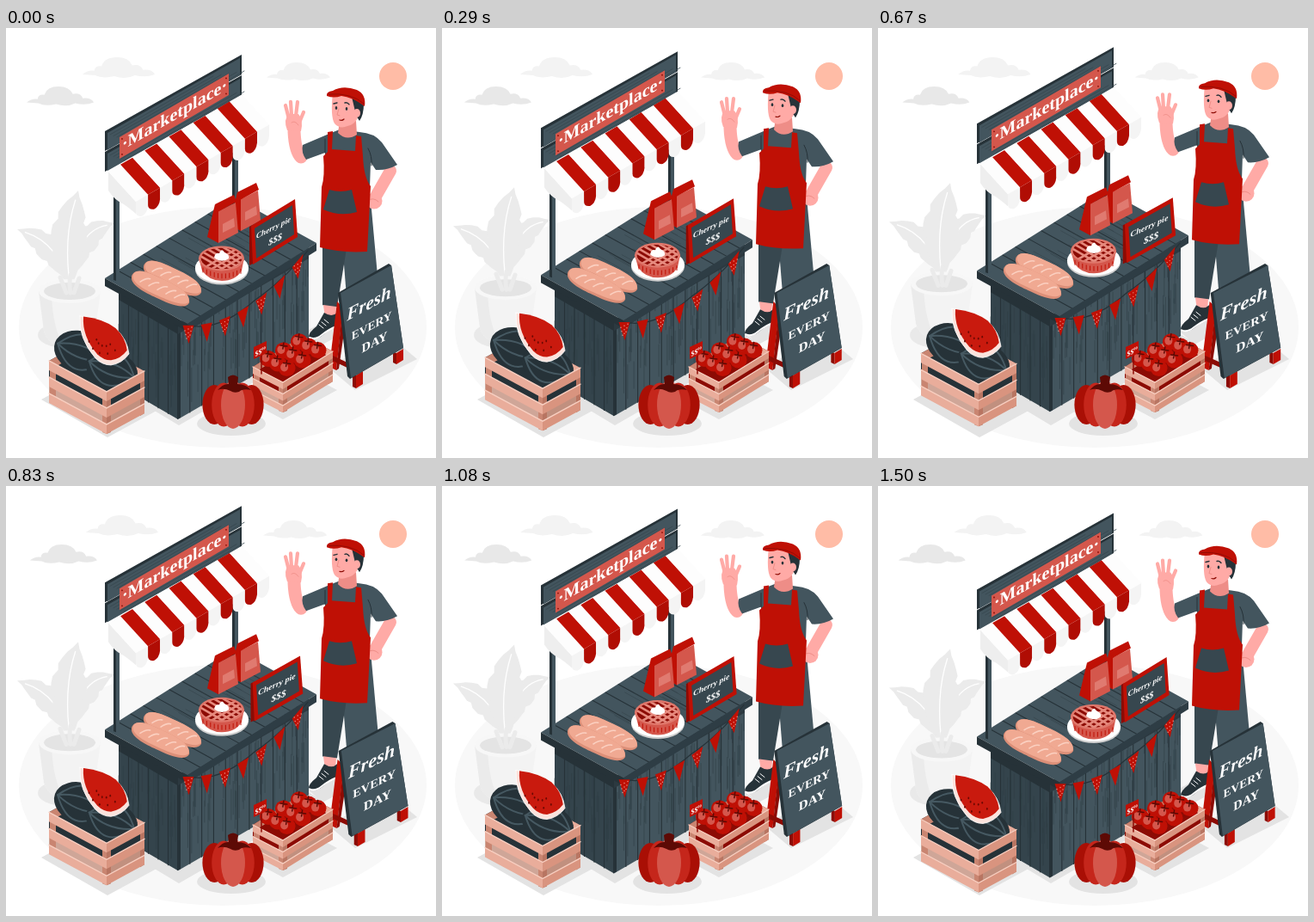
An HTML page that plays this animation: 500x500 px, repeating every 1540 ms.

```html
<!DOCTYPE html>
<html lang="en">
<head>
<meta charset="utf-8">
<title>Market stall</title>
<style>
html, body { margin: 0; width: 100%; height: 100%; overflow: hidden; background: #fff }
svg { display: block; width: 100vw; height: 100vh }
text { fill: #fff; font-family: "Liberation Serif", serif; font-weight: bold; text-anchor: middle }
.script { font-style: italic }
</style>
</head>
<body>
<svg id="stage" viewBox="0 0 500 500"></svg>
<script>
const RED = '#bf1005', ROSE = '#d4574c', WINE = '#8c0b04', SLATE = '#37474f', STEEL = '#43555e',
      INK = '#263238', SKIN = '#ffaaa6', SKIN_DARK = '#ee8d87', PALE = '#ebebeb', SHADE = '#e3e3e3';

let seed = 7;
const rnd = () => (seed = seed * 16807 % 2147483647) / 2147483647;
const times = (n, f) => Array.from({length: n}, (_, i) => f(i)).join('');

const poly = (pts, fill) => `<polygon points="${pts}" fill="${fill}"/>`;
const shape = (d, fill) => `<path d="${d}" fill="${fill}"/>`;
const line = (d, color, w = 1) =>
  `<path d="${d}" fill="none" stroke="${color}" stroke-width="${w}" stroke-linecap="round"/>`;
const oval = (x, y, rx, ry, fill) => `<ellipse cx="${x}" cy="${y}" rx="${rx}" ry="${ry}" fill="${fill}"/>`;
const at = (x, y, body, more = '') => `<g transform="translate(${x} ${y}) ${more}">${body}</g>`;
const group = (move, body) => `<g data-move="${move}">${body}</g>`;
const clip = (id, mask, body) => `<clipPath id="${id}">${mask}</clipPath><g clip-path="url(#${id})">${body}</g>`;
const slanted = (s, x, y, size, slope, kind = '') =>
  `<text transform="matrix(1 ${slope} 0 1 ${x} ${y})" font-size="${size}" class="${kind}">${s}</text>`;

// Upright parallelogram on a slanted edge, and flat one from its left, front and right corners
const wall = (x0, y0, x1, y1, h, fill) => poly([x0, y0, x1, y1, x1, y1 + h, x0, y0 + h], fill);
const slab = ([lx, ly], [fx, fy], [rx, ry], fill) => poly([lx, ly, fx, fy, rx, ry, lx + rx - fx, ly + ry - fy], fill);
const post = (x, y, h) => wall(x, y, x + 3, y + 1, h, INK) + wall(x + 3, y + 1, x + 7, y - 1, h, STEEL);
const leg = (x, y, h) => wall(x, y, x + 4, y + 2, h, WINE) + wall(x + 4, y + 2, x + 12, y - 3, h, RED);

function planks(x0, y0, x1, y1, h, n, fill) {
  const stroke = (k, a, len, color, w) => line(`M${x0 + (x1 - x0) * k} ${y0 + (y1 - y0) * k + a * h}v${len * h}`, color, w);
  return wall(x0, y0, x1, y1, h, fill) +
    times(n * 7, () => stroke(rnd(), rnd() * .6, .15 + rnd() * .25, '#2f3e46', .6)) +
    times(n - 1, i => stroke((i + 1) / n, 0, 1, INK, 1.1));
}

function crate(L, F, R, gap, slat, inside, goods) {
  const [lx, ly] = L, [fx, fy] = F, [rx, ry] = R, bx = lx + rx - fx, by = ly + ry - fy, h = gap * 2 + slat;
  const sides = (dy, tall, left, right) => wall(lx, ly + dy, fx, fy + dy, tall, left) + wall(fx, fy + dy, rx, ry + dy, tall, right);
  const row = i => sides(i * gap, slat, '#e9ad9b', '#d9947f') +
    line(`M${lx} ${ly + i * gap}L${fx} ${fy + i * gap}L${rx} ${ry + i * gap}`, '#f8cfc1', 1.4);
  return slab(L, F, R, inside) + wall(lx, ly, bx, by, slat, '#c98571') + wall(bx, by, rx, ry, slat, '#e9ad9b') +
    sides(0, gap * 2, inside, inside) + sides(gap + 2, gap, '#cfa698', '#c1907f') + goods +
    post(lx + 1, ly + 2, h - 2).replaceAll(INK, '#c98571').replaceAll(STEEL, '#c98571') +
    wall(rx - 5, ry + 3, rx, ry, h, '#b87562') + wall(fx - 5, fy - 2, fx, fy, h, '#c98571') +
    wall(fx, fy, fx + 5, fy - 2, h, '#b87562') + times(3, row);
}

const cloud = (x, y, w, fill) => at(x, y,
  shape('M0 19Q6 14 13 15Q14 9 21 10Q24 0 38 0Q51 0 55 9Q64 7 67 14Q77 13 80 19Q70 23 58 20Q48 25 35 21Q22 24 14 20Z', fill), `scale(${w / 80})`);

// Notched leaf along a quadratic spine
function leaf(bend, tip, width) {
  const base = [75, 304], n = 16;
  const spine = t => [0, 1].map(i => base[i] * (1 - t) ** 2 + 2 * bend[i] * t * (1 - t) + tip[i] * t * t);
  const edge = side => Array.from({length: n + 1}, (_, i) => {
    const t = i / n, [x, y] = spine(t), [u, v] = spine(t + .01), d = Math.hypot(u - x, v - y);
    const w = side * width * Math.sin(Math.PI * t ** 1.15) * (i % 4 == 3 ? .8 : 1);
    return [x - (v - y) / d * w, y + (u - x) / d * w];
  });
  return poly([...edge(1), ...edge(-1).reverse()].join(' '), PALE) + line(`M${base}Q${bend} ${spine(.9)}`, '#fff', 1.3);
}

const plant = () => leaf([62, 250], [13, 234], 15) + leaf([80, 236], [126, 227], 15) + leaf([66, 245], [84, 189], 21) +
  shape('M38 306L44 352Q48 370 74 372Q99 370 104 350L110 306Z', '#f3f3f3') +
  shape('M38 306L44 352Q48 368 68 371Q54 350 53 308Z', PALE) +
  oval(74, 306, 36, 14, '#f7f7f7') + oval(74, 306, 30, 10, '#e4e4e4') +
  line('M75 308Q73 298 75 287M70 308L63 290M79 308L85 291', PALE, 5);

function man() {
  const raised = line('M335 120Q336 143 343 150', SKIN, 15) + line('M344 147L376 133', SKIN, 13) +
    shape('M327 119Q322 106 329 100L340 100Q346 106 343 120Z', SKIN) +
    line('M329 106L325 90M332 102L331 86M337 102L339 86M341 110L346 98', SKIN, 4.2) +
    line('M332 110Q336 107 340 113', SKIN_DARK, .8);
  const legs = shape('M391 250L424 200 434 310 397 325Z', STEEL) + shape('M368 248L397 250 385 324Q376 327 368 322Z', SLATE) +
    shape('M369 322L384 324 383 337 371 337Z', SKIN) +
    shape('M370 331Q379 337 385 331V346Q375 351 366 359Q357 364 352 359Q352 354 361 347Z', INK) +
    line('M353 360Q360 363 367 357Q376 350 384 347', '#fff', 2) + times(3, i => line(`M${364 + i * 3} ${345 - i * 3}l5 4`, '#fff'));
  const body = line('M447 166L431 194', SKIN, 14) + oval(428, 201, 9.5, 9.5, SKIN) + line('M420 201Q427 196 433 202', SKIN_DARK) +
    shape('M388 118L411 121Q428 122 437 133L455 159Q443 166 430 165L424 156 422 215 371 215V145L349 153Q343 145 345 136L378 122Z', STEEL) +
    line('M371 129V145M421 140Q426 149 425 160', INK);
  const apron = shape('M374 121L380 120 379 141 406 143 407 125 413 126 415 149Q416 174 424 184L420 260Q390 262 365 255L367 185Q371 173 369 149L374 144Z', RED) +
    shape('M376 188Q389 192 402 188L408 214Q388 220 369 211Z', SLATE);
  const head = shape('M388 108H407L408 124Q396 132 386 122Z', SKIN_DARK) +
    shape('M380 75Q377 103 382 111Q388 118 397 114Q408 112 411 98L409 78Z', SKIN) +
    shape('M402 80L416 88Q416 101 411 108Q407 103 406 97Z', INK) + oval(408, 99, 4, 5, SKIN) +
    oval(384, 93, 1.3, 1.9, INK) + oval(396, 94, 1.3, 1.9, INK) + line('M381 88l4-1M394 87q3-1 5 2', INK, 1.4) +
    line('M387 94l-2 7 3 1', SKIN_DARK) + line('M388 107q3 1 5-1', WINE, 1.2) +
    shape('M373 79Q372 74 380 73Q392 66 408 72Q419 77 417 91Q402 80 390 79Q381 82 373 79Z', RED) +
    line('M375 77Q402 75 416 88', WINE, .8);
  return raised + legs + body + apron + head;
}

function awning() {
  const w = 14.1, top = x => 167 - (x - 119) * .577, fold = x => 202 - (x - 151) * .577;
  return shape('M119 167L151 202V216Q143 209 137 205Q126 200 119 189Z', '#eee') + times(11, i => {
    const a = 119 + i * w, b = 151 + i * w, red = i % 2;
    return poly([a, top(a), a + w, top(a + w), b + w, fold(b + w), b, fold(b)], red ? RED : '#fdfdfd') +
      shape(`M${b} ${fold(b)}L${b + w} ${fold(b + w)}v13q-1 9 ${-w / 2} 12q-7 1 ${-w / 2} -5Z`, red ? '#b00d04' : '#f4f4f4');
  });
}

function bunting() {
  const y = x => 346 - 75 * ((x - 212) / 127) ** 2;
  const dots = x => times(9, k => {
    const row = k / 3 | 0;
    return oval(x + (k % 3 - 1) * (4 - row), y(x) + 4 + row * 4.5 - (k % 3 - 1) * 2, .7, .7, '#ed9a90');
  });
  return line('M205 344Q244 357 290 316Q320 296 351 259', INK, 1.2) + times(7, i => {
    const x = 212 + i * 21.2;
    return poly([x - 6.5, y(x - 6.5), x + 6.5, y(x + 6.5), x + .5, y(x) + 21], RED) + (i % 2 ? '' : dots(x));
  });
}

const bag = (x, y) => at(x, y, poly('9,4 0,42 13,49 15,12', RED) + poly('13,12 33,2 36,37 13,49', ROSE) +
  poly('9,4 31,-7 34,1 12,13', RED) + poly('18,27 31,20 32,30 18,37', '#e07a70'));

function pie() {
  const lattice = times(8, i => line(`M${200 + i * 11} 250l60 35m-40 0l60 -35`, '#e68a7e', 2.6));
  return oval(251, 281, 31, 17.5, '#cfcfcf') + oval(251, 279, 31, 17.5, '#fff') +
    shape('M224 267L228 282Q236 294 251 294Q267 294 274 282L277 267Z', ROSE) +
    times(11, i => line(`M${229 + i * 4.4} ${278 + 8 * Math.sin((i + .5) * .27)}v5`, RED)) +
    oval(250.5, 268, 26.5, 14.5, '#e0776b') +
    clip('crust', oval(250.5, 268, 24, 12.5), oval(250.5, 268, 24, 12.5, WINE) + lattice) +
    shape('M242 267Q243 261 248 262Q251 255 254 261Q260 263 259 268Q251 274 242 267Z', '#fff');
}

const loaf = (x, y) => at(x, y, shape('M-37 0C-36 -13 -12 -11 0 -11C15 -11 34 -10 37 1C36 12 14 12 0 12C-14 12 -36 12 -37 0Z', '#dc8f78') +
  shape('M-36 -2C-35 -12 -12 -11 0 -11C15 -11 34 -10 36 0C35 8 14 9 0 9C-14 9 -36 9 -36 -2Z', '#f0a992') +
  times(5, i => line(`M${-25 + i * 11} 3q4 -7 9 -8`, '#fbd0c1', 1.6)), 'rotate(25)');

function stall() {
  const sign = i => at(0, i * 24, wall(115, 120, 274, 31, 23, INK) + wall(118, 122, 272, 35, 20, STEEL) +
    times(5, k => line(`M${121 + k * 4} ${124 + k * 1.5}l${120 + k * 5} ${-68 - k * 3}`, SLATE, .8)));
  const L = [115, 291], F = [211, 344], R = [361, 250];
  const seams = times(9, i => {
    const x = 130 + i * 15, y = 282 - i * 9.4;
    return line(`M${x} ${y}l96 53`, INK, 1.1) + times(3, () => line(`M${x + rnd() * 50} ${y + 2 + rnd() * 25}m0 0l36 20`, '#34434b', .6));
  });
  return planks(131, 303, 200, 343, 112, 6, '#34444c') + planks(200, 343, 352, 255, 112, 11, STEEL) +
    wall(199, 343, 203, 341, 112, INK) + wall(131, 306, 200, 346, 10, INK) + wall(200, 346, 352, 258, 10, '#2c3940') +
    slab(L, F, R, STEEL) + clip('counter', slab(L, F, R), seams) +
    wall(...L, ...F, 9, INK) + wall(...F, ...R, 9, '#2e3d45') +
    post(125, 186, 107) + post(263, 145, 75) + sign(0) + sign(1) + wall(132, 127, 259, 53, 25, ROSE) +
    times(4, i => oval(135 + (i & 1) * 121, 129 - (i & 1) * 70.5 + (i >> 1) * 18, .9, .9, WINE)) +
    slanted('·Marketplace·', 196, 107, 20, -.577) + awning() +
    bag(260, 187) + bag(234, 201) + pie() + loaf(194, 291) + loaf(180, 303) + bunting();
}

const card = () => wall(283, 231, 287, 229, 45, WINE) + poly('285,230 336,199 339,243 287,275', RED) +
  poly('289,233 333,206 335,240 291,268', SLATE) +
  slanted('Cherry pie', 311, 235, 9.2, -.5, 'script') + slanted('$$$', 313, 249, 10.5, -.5, 'script');

const board = () => poly('385,318 392,325 384,398 376,394', RED) + poly('391,330 384,398 387,396 395,340', WINE) +
  wall(380, 381, 399, 390, 6, WINE) + leg(403, 402, 15) + leg(450, 376, 13) +
  poly('386,308 445,274 448,276 462,372 400,408 397,405', INK) + poly('389,308 448,276 462,372 401,407', STEEL) +
  slanted('Fresh', 422, 327, 21, -.54, 'script') + slanted('EVERY', 425, 350.5, 13.5, -.54) + slanted('DAY', 428.5, 370, 14.5, -.54);

function melons() {
  const melon = (x, y, rx, ry) => at(x, y, oval(0, 0, rx, ry, INK) + times(4, i =>
    line(`M${-rx * .9} 0Q0 ${(i - 1.5) * ry * 1.15} ${rx * .9} 0`, '#465962', 2)), 'rotate(20)');
  const wedge = 'M86 335Q84 361 104 384Q112 392 122 392Q135 390 143 379Q141 362 128 350Q112 338 86 335Z';
  return melon(88, 377, 33, 24) + melon(123, 397, 31, 22) + shape(wedge, '#fbe3dd') + line(wedge, '#fff', .8) +
    at(13.5, 37.5, shape(wedge, '#c91a0e'), 'scale(.89)') + times(10, i => {
      const a = .9 + (i >> 1) * .5, r = i % 2 ? 19 : 10;
      return oval(115 + r * Math.cos(a), 360 + r * Math.sin(a), .9, 1.4, '#6d0903');
    });
}

const tomatoes = () => times(9, i => {
  const u = .82 - (i / 3 | 0) * .31, v = .18 + i % 3 * .31;
  return at(287 + 58 * u + 35 * v, 388 - 36 * u + 18 * v + rnd() * 4, oval(0, 0, 10, 9.5, RED) + oval(-3, -1, 4.5, 5, ROSE) +
    line('M-4 -6L4 -5M0 -9L-1 -2', '#5d0a05', 1.5));
});

const tag = () => line('M297 378V402', WINE, 1.5) + wall(288, 371, 303, 364, 14, RED) +
  slanted('$$', 293.5, 380, 8, -.5) + slanted('00', 299.5, 374, 4.5, -.5);

const pumpkin = () => [-2, 2, -1, 1, 0].map(i => {
  const far = Math.abs(i);
  return oval(264 + i * 10.8, 438, 14, 28 - far * 2.5, [ROSE, '#c5261b', '#a90f05'][far]);
}).join('') + shape('M246 421Q253 413 259 414L258 406Q264 401 270 406L269 414Q279 414 285 421Q275 419 271 423Q265 425 261 422Q253 418 246 421Z', '#5d0a05');

const shadows = () => oval(68, 357, 31, 15, '#e9e9e9') + oval(262, 460, 40, 14, SHADE) +
  slab([116, 411], [201, 462], [368, 366], SHADE) + slab([41, 432], [118, 476], [175, 445], SHADE) +
  slab([277, 431], [322, 455], [385, 421], SHADE) + slab([350, 352], [368, 368], [420, 340], SHADE) +
  slab([374, 394], [406, 421], [478, 385], SHADE);

document.getElementById('stage').innerHTML =
  oval(252, 348, 237, 140, '#f8f8f8') + oval(450, 56, 16, 16, '#ffbca6') +
  group('drift', cloud(24, 68, 78, '#e8e8e8') + cloud(89, 34, 84, '#f3f3f3')) + group('back', cloud(303, 40, 74, '#f3f3f3')) +
  shadows() + group('float', plant() + man() + stall()) + group('card', card()) + group('board', board()) +
  group('float', crate([50, 387], [117, 423], [161, 399], 19, 11, INK, melons())) +
  crate([287, 394], [322, 412], [380, 376], 13.5, 8, WINE, tomatoes()) + tag() + pumpkin();

const LOOP = 1540, STEPS = 37, PEAK = 690;
const moves = {
  float: k => `translate(0 ${-10 * k})`,
  drift: k => `translate(${5 * k} 0)`,
  back: k => `translate(${-5 * k} 0)`,
  card: k => `translate(${283 + 2 * k} ${-2 * k}) scale(${1 + .11 * k} 1) translate(-283 0)`,
  board: k => `translate(376 0) scale(${1 + .083 * k} 1) translate(-376 0)`
};
const parts = [...document.querySelectorAll('[data-move]')];
const start = performance.now();

function frame() {
  const t = Math.floor((performance.now() - start) % LOOP / LOOP * STEPS + .02) * LOOP / STEPS;
  const away = Math.abs(t - PEAK), near = Math.min(away, LOOP - away);
  const k = .9 - near / (LOOP / 2);
  for (const p of parts) p.setAttribute('transform', moves[p.dataset.move](k));
  requestAnimationFrame(frame);
}
frame();
</script>
</body>
</html>
```
